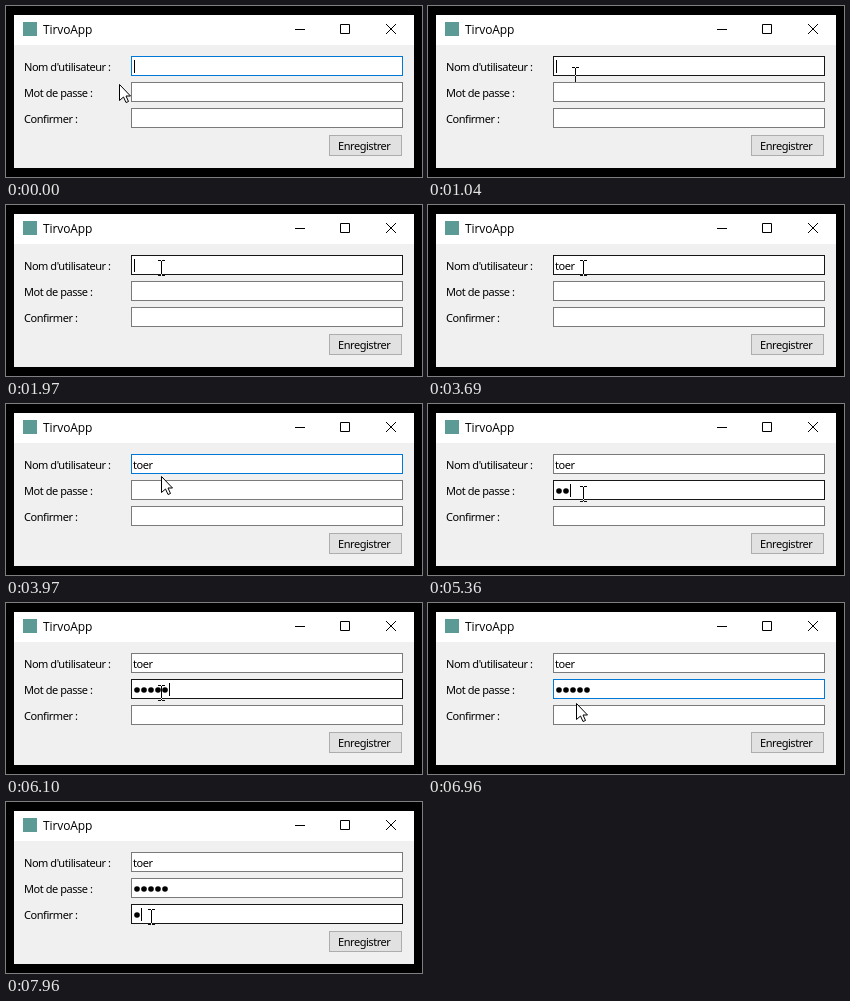
An HTML page with a canvas that plays this animation: 416x171 px, repeating every 8000 ms.

```html
<!DOCTYPE html>
<html lang="fr">
<head>
<meta charset="utf-8">
<title>TirvoApp</title>
<style>
  html, body { margin: 0; width: 100%; height: 100%; overflow: hidden; background: #000; }
  canvas { display: block; width: 416px; height: 171px; }
</style>
</head>
<body>
<canvas id="stage" width="416" height="171"></canvas>
<script>
const ctx = document.getElementById('stage').getContext('2d');
const LOOP = 8000;
const USER = 'toer';
const LABELS = ["Nom d'utilisateur :", 'Mot de passe :', 'Confirmer :'];
const UI_FONT = '11px "Noto Sans", "Open Sans", sans-serif';
const TITLE_FONT = '12px "Open Sans", "Noto Sans", sans-serif';
const FIELD = { x: 125, y: 50, w: 272, h: 20, step: 26 };

// Each track lists [start ms, value...]; a value holds until the next entry.
const pointer = [
  [0, 'arrow', 113, 78], [890, 'arrow', 134, 75],
  [1040, 'beam', 147, 61], [1170, 'beam', 152, 57], [1290, 'beam', 154, 56], [1420, 'beam', 155, 55],
  [3840, 'beam', 155, 58], [3970, 'arrow', 155, 72], [4090, 'beam', 155, 79], [4210, 'beam', 155, 82],
  [6810, 'beam', 154, 86], [6960, 'arrow', 148, 100],
  [7100, 'beam', 146, 105], [7230, 'beam', 145, 107]
];
const hover = [[0, -1], [1040, 0], [3970, -1], [4090, 1], [6960, -1], [7100, 2]];
const focus = [[0, 0], [4370, 1], [7230, 2]];
const caret = [
  [0, 1], [460, 0], [890, 1], [1420, 0], [1970, 1], [3690, 0], [4210, 1],
  [4950, 0], [5230, 1], [6810, 0], [7830, 0], [7960, 1]
];
// The caret shows again as soon as a field is clicked.
caret.splice(10, 0, [7230, 1]);

const keys = [
  [2270, 2550, 2680, 2970],
  [5230, 5360, 5780, 5940, 6100],
  [7960]
];

const at = (track, t) => track.findLast(e => e[0] <= t).slice(1);
const typed = (i, t) => keys[i].filter(k => k <= t).length;

function box(x, y, w, h, fill, line) {
  ctx.fillStyle = line;
  ctx.fillRect(x, y, w, h);
  ctx.fillStyle = fill;
  ctx.fillRect(x + 1, y + 1, w - 2, h - 2);
}

function text(str, x, y, font = UI_FONT, spacing = '-0.45px') {
  ctx.font = font;
  ctx.letterSpacing = spacing;
  ctx.fillStyle = '#000';
  ctx.fillText(str, x, y);
  return ctx.measureText(str).width;
}

function drawWindow() {
  ctx.fillStyle = '#000';
  ctx.fillRect(0, 0, 416, 171);
  ctx.fillStyle = '#f0f0f0';
  ctx.fillRect(8, 9, 400, 153);
  ctx.fillStyle = '#fff';
  ctx.fillRect(8, 9, 400, 30);
  ctx.fillStyle = '#5c9a96';
  ctx.fillRect(17, 16, 14, 14);
  text('TirvoApp', 37, 28, TITLE_FONT, '-0.1px');

  ctx.strokeStyle = '#000';
  ctx.lineWidth = 1;
  ctx.beginPath();
  ctx.moveTo(289, 23.5);
  ctx.lineTo(299, 23.5);
  ctx.rect(334.5, 18.5, 9, 9);
  ctx.moveTo(380, 18);
  ctx.lineTo(390, 28);
  ctx.moveTo(390, 18);
  ctx.lineTo(380, 28);
  ctx.stroke();

  box(323, 129, 73, 21, '#e1e1e1', '#adadad');
  text('Enregistrer', 332, 144);
}

function drawField(i, t) {
  const y = FIELD.y + i * FIELD.step;
  const focused = at(focus, t)[0] === i;
  const hovered = at(hover, t)[0] === i;
  const n = typed(i, t);
  let width = 7 * n;

  text(LABELS[i], 18, y + 15);
  box(FIELD.x, y, FIELD.w, FIELD.h, '#fff', hovered ? '#171717' : focused ? '#0078d7' : '#7a7a7a');

  if (i === 0) {
    width = Math.round(text(USER.slice(0, n), 127, y + 15));
  } else {
    ctx.fillStyle = '#000';
    for (let k = 0; k < n; k++) {
      ctx.beginPath();
      ctx.arc(131 + 7 * k, y + 11, 2.8, 0, 2 * Math.PI);
      ctx.fill();
    }
  }
  if (focused && at(caret, t)[0]) {
    ctx.fillStyle = '#000';
    ctx.fillRect(128 + width, y + 4, 1, 13);
  }
}

function drawArrow() {
  const pts = [[0, 0], [0, 16], [4, 12.5], [6.5, 18], [9, 17], [6.5, 11.5], [11, 11.5]];
  ctx.beginPath();
  pts.forEach(([x, y]) => ctx.lineTo(x + 0.5, y + 0.5));
  ctx.closePath();
  ctx.fillStyle = '#fff';
  ctx.fill();
  ctx.strokeStyle = '#000';
  ctx.lineWidth = 1;
  ctx.stroke();
}

// The text pointer inverts whatever lies under it.
function drawBeam() {
  ctx.globalCompositeOperation = 'difference';
  ctx.fillStyle = '#fff';
  for (const y of [0, 15]) {
    ctx.fillRect(-3, y, 3, 1);
    ctx.fillRect(1, y, 3, 1);
  }
  ctx.fillRect(0, 1, 1, 14);
}

function draw(t) {
  drawWindow();
  LABELS.forEach((_, i) => drawField(i, t));
  const [kind, x, y] = at(pointer, t);
  ctx.save();
  ctx.translate(x, y);
  (kind === 'arrow' ? drawArrow : drawBeam)();
  ctx.restore();
}

const start = performance.now();
function tick() {
  draw((performance.now() - start) % LOOP);
  requestAnimationFrame(tick);
}
tick();
</script>
</body>
</html>
```
